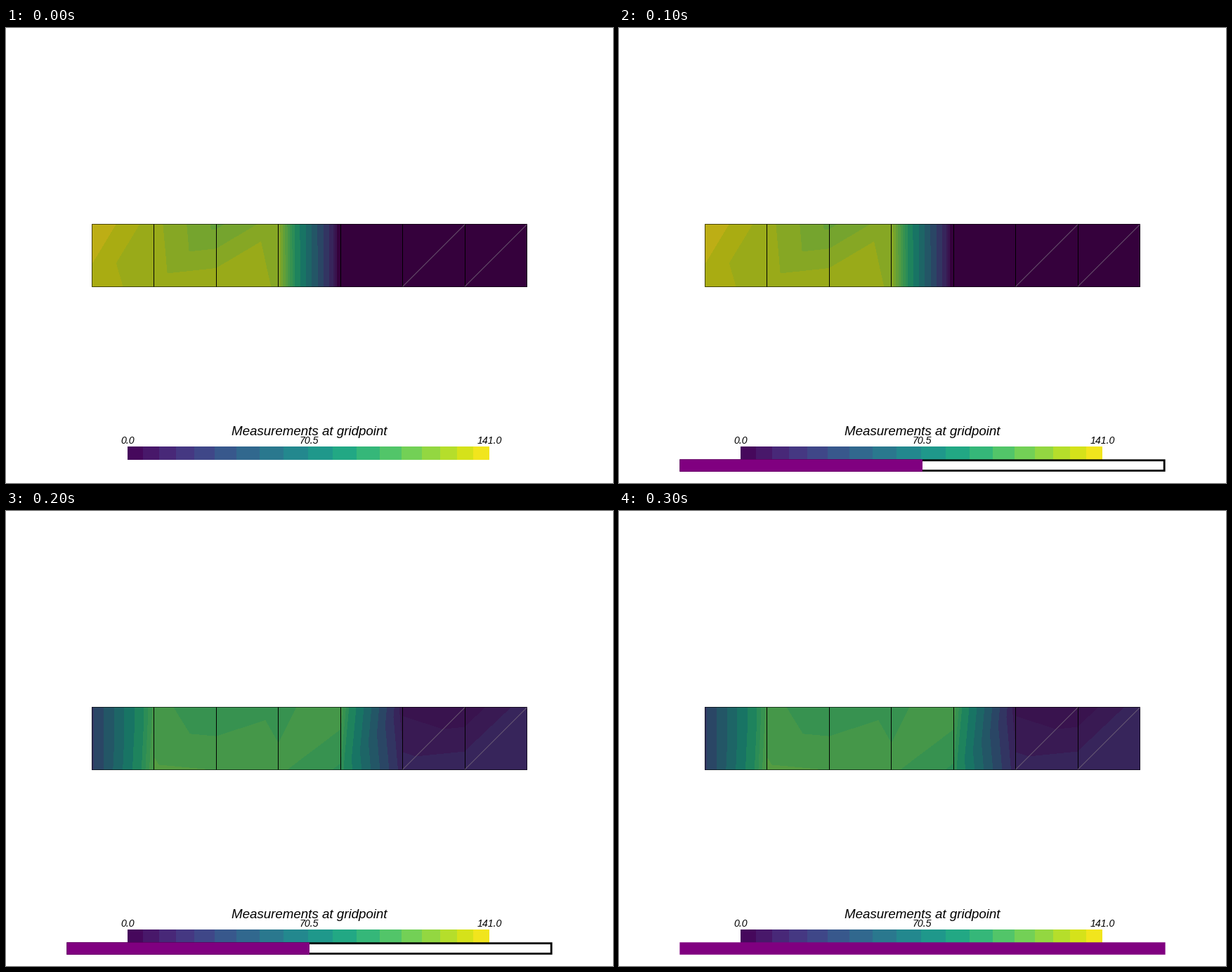
These frames come from a looping animation (864x648 px, 400 ms). A matplotlib script:

```python
import matplotlib.pyplot as plt
import numpy as np
from matplotlib.animation import FuncAnimation
from matplotlib.patches import Rectangle
from matplotlib.tri import Triangulation

W, H, DPI = 864, 648, 100
PX = 72 / DPI
PEAK = 141
CELLS = 7
TOP, BOTTOM = 279.8, 368.2
XS = np.linspace(122.5, 741.5, CELLS + 1)
VIRIDIS = plt.get_cmap("viridis")
LIGHT = np.array([0.785, 0.76, 0.72])

# Measurements along the upper and lower row of grid points
BEFORE = ([139.6, 127.2, 114.9, 123.8, 0, 0, 0, 0],
          [132.1, 128.3, 129.9, 124.9, 0, 0, 0, 0])
AFTER = ([33, 103.8, 98, 100.8, 105, 10.7, 8.5, 18],
         [33, 107.4, 106.6, 102.9, 96.4, 17.5, 18.5, 18])

# Colour steps are finer at both ends of the scale
LEVELS = np.r_[-0.055, np.linspace(0.055, 0.111, 3), 0.17,
               np.linspace(0.25, 0.58, 5), np.linspace(0.657, 0.957, 10), 1]

fig = plt.figure(figsize=(W / DPI, H / DPI), dpi=DPI, facecolor="white")
ax = fig.add_axes([0, 0, 1, 1])
ax.set_autoscale_on(False)
ax.set_xlim(0, W)
ax.set_ylim(H, 0)
ax.axis("off")


def strip_mesh():
    """Two triangles per cell, split from lower left to upper right."""
    n = CELLS + 1
    tris = []
    for i in range(CELLS):
        tris += [(i, i + 1, n + i), (i + 1, n + i + 1, n + i)]
    return Triangulation(np.tile(XS, 2), np.repeat([TOP, BOTTOM], n), tris)


def draw_field(mesh, rows):
    mids = np.clip((LEVELS[1:] + LEVELS[:-1]) / 2, 0, 1)
    return ax.tricontourf(mesh, np.ravel(rows) / PEAK, levels=LEVELS,
                          colors=VIRIDIS(mids)[:, :3] * LIGHT,
                          antialiased=False, zorder=1)


def line(xs, ys, color="black", alpha=1):
    ax.plot(xs, ys, color=color, alpha=alpha, lw=PX, snap=False,
            solid_capstyle="butt", zorder=3)


def box(x, y, w, h, color, z, smooth=True):
    return ax.add_patch(Rectangle((x, y), w, h, facecolor=color, linewidth=0,
                                  antialiased=smooth, snap=False, zorder=z))


def label(x, y, s, size):
    ax.text(x, y, s, fontsize=size * PX, family="Liberation Sans", style="italic",
            ha="center", va="baseline", color="black", zorder=8)


mesh = strip_mesh()
fields = [draw_field(mesh, rows) for rows in (BEFORE, AFTER)]

# Mesh edges, centred on whole pixels
cols = np.floor(XS) + 0.5
rows = np.floor([TOP, BOTTOM]) + 0.5
for x in cols[1:-1]:
    line([x, x], rows)
for x in cols[[0, -1]]:
    line([x, x], rows, alpha=0.6)
for y in rows:
    line(cols[[0, -1]], [y, y], alpha=0.6)
for i in (5, 6):
    line(XS[i:i + 2], [BOTTOM, TOP], "#75687a", 0.8)

# Colour scale: the bands widen towards the middle
LEFT, SPAN, BANDS = 173, 515, 18
u = np.linspace(0, 1, BANDS + 1)
stops = u - 0.23 * np.sin(2 * np.pi * u) / (2 * np.pi)
for a, b in zip(stops, stops[1:]):
    box(LEFT + SPAN * a, 596, SPAN * (b - a), 19, VIRIDIS((a + b) / 2), 5, False)
label(431.8, 580, "Measurements at gridpoint", 18.75)
for k in (0, 0.5, 1):
    label(LEFT + 0.3 + k * SPAN, 591.5, f"{k * PEAK:.1f}", 14.1)

# Progress bar
BAR_X, BAR_Y, BAR_W, BAR_H, EDGE = 0.1 * W, 614.3, 0.8 * W, 17.5, 2.8
frame = [box(BAR_X, BAR_Y, BAR_W, BAR_H, "black", 6),
         box(BAR_X + EDGE, BAR_Y + EDGE, BAR_W - 2 * EDGE, BAR_H - 2 * EDGE,
             "white", 6.1)]
fill = box(BAR_X, BAR_Y, 0, BAR_H, "purple", 7)


def update(i):
    for k, field in enumerate(fields):
        field.set_visible(k == i // 2)
    for part in frame:
        part.set_visible(0 < i < 3)
    fill.set_visible(i > 0)
    fill.set_width(BAR_W * ((i + 1) // 2) / 2)
    return [fill]


anim = FuncAnimation(fig, update, frames=4, init_func=lambda: update(0),
                     interval=100, repeat=True, repeat_delay=0, blit=False)
plt.show()
```
